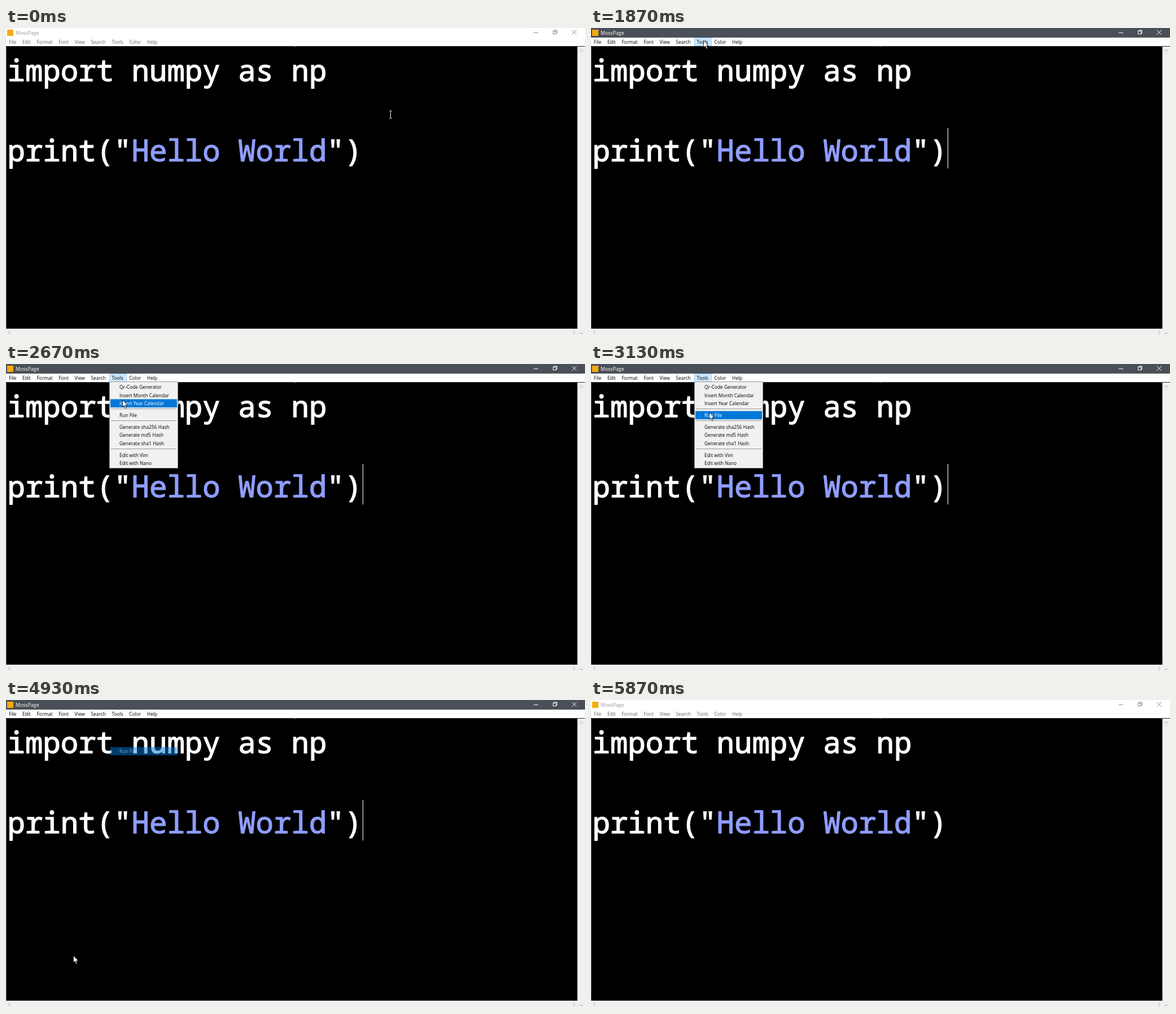
An HTML page with a canvas for the animation above (6.19 s loop, 1026 by 546 pixels).

```html
<!DOCTYPE html>
<html lang="en">
<head>
<meta charset="utf-8">
<title>MossPage</title>
<style>
html, body { margin: 0; width: 100%; height: 100%; overflow: hidden; background: #000; }
canvas { display: block; }
</style>
</head>
<body>
<canvas id="stage" width="1026" height="546"></canvas>
<script>
const ctx = document.getElementById('stage').getContext('2d');
const LOOP = 6190;
const STEP = 1000 / 15; // the pointer moves at 15 steps per second
const UI = '"Open Sans", "Noto Sans", sans-serif';
const CODE = '500 52.4px "Noto Sans Mono", "DejaVu Sans Mono", monospace';
const LABEL = '8.4px ' + UI;
const BLUE = '#8f9dff';

const FOCUS = [1870, 5870];
const MENU = [2070, 4870];
const LINGER = [4870, 5130];
const POINTER_GONE = 5600;

// pointer moves: start, end, target x, target y
const HOME = [681.5, 153.5];
const MOVES = [
  [600, 730, 300.5, 41], [800, 930, 279, 72], [930, 1400, 199.5, 22],
  [2470, 2730, 207, 66], [2800, 3130, 209.5, 85.5], [3530, 3870, 214.5, 89.5],
  [4800, 4930, 119.5, 453], [5000, 5130, 107.5, 501], [5200, 5530, 52.5, 540]
];

const TABS = ['File', 'Edit', 'Format', 'Font', 'View', 'Search', 'Tools', 'Color', 'Help'];
const GROUPS = [
  ['Qr-Code Generator', 'Insert Month Calendar', 'Insert Year Calendar'],
  ['Run File'],
  ['Generate sha256 Hash', 'Generate md5 Hash', 'Generate sha1 Hash'],
  ['Edit with Vim', 'Edit with Nano']
];
const ROW = 14.35, GAP = 6.7;

const within = (t, [from, to]) => t >= from && t < to;

// lays the menu groups out from the top, with a rule above all but the first
const items = [], rules = [];
let rowY = 41;
for (const group of GROUPS) {
  if (items.length) {
    rules.push(Math.round(rowY - ROW / 2 - 1));
    rowY += GAP;
  }
  for (const label of group) {
    items.push({ label, y: rowY });
    rowY += ROW;
  }
}
const chosen = items.find(item => item.label === 'Run File');

function rect(x, y, w, h, color) {
  ctx.fillStyle = color;
  ctx.fillRect(x, y, w, h);
}

function frame(x, y, w, h, color) {
  ctx.strokeStyle = color;
  ctx.lineWidth = 1;
  ctx.strokeRect(x + 0.5, y + 0.5, w - 1, h - 1);
}

function text(s, x, y, color, font, weight = 0) {
  ctx.font = font;
  ctx.fillStyle = ctx.strokeStyle = color;
  ctx.fillText(s, x, y);
  if (weight) {
    ctx.lineWidth = weight;
    ctx.strokeText(s, x, y);
  }
  return x + ctx.measureText(s).width;
}

function path(points, color) {
  ctx.beginPath();
  points.forEach(([x, y]) => ctx.lineTo(x, y));
  ctx.strokeStyle = color;
  ctx.lineWidth = 1;
  ctx.stroke();
}

function chevron(x, y, dx, dy) {
  const a = 3, b = 1.6;
  path([[x - b * dx - a * dy, y - b * dy - a * dx], [x + b * dx, y + b * dy],
    [x - b * dx + a * dy, y - b * dy + a * dx]], '#a3a3a3');
}

function titleBar(active) {
  const ink = active ? '#fff' : '#8c8c8c';
  rect(0, 0, 1026, 17, active ? '#4b5058' : '#fff');
  rect(2, 3, 11, 11, '#f5aa0c');
  text('MossPage', 17, 12, active ? '#fff' : '#999', '8.8px ' + UI);
  path([[935, 8.5], [943, 8.5]], ink);
  frame(969, 5, 6, 6, ink);
  path([[971, 5], [971, 3.9], [976.5, 3.9], [976.5, 9.5], [975, 9.5]], ink);
  path([[1003, 3.7], [1011, 11.7]], ink);
  path([[1011, 3.7], [1003, 11.7]], ink);
}

function menuBar(active, hot) {
  rect(0, 17, 1026, 15, '#fff');
  if (hot) {
    rect(183, 17, 31, 15, '#cce8ff');
    frame(183, 17, 31, 15, '#99d1ff');
  }
  let x = 5;
  for (const tab of TABS) x = text(tab, x, 27.7, active ? '#000' : '#666', LABEL) + 10.7;
}

function code(s, x, y, color) {
  return text(s, x, y, color, CODE, 1.3);
}

function editor(caret) {
  rect(0, 32, 1026, 514, '#f0f0f0');
  rect(0, 32, 1012.5, 501, '#000');
  rect(0, 32, 1026, 1, '#26332b');
  rect(0, 33, 1, 500, '#555');
  rect(512, 32, 1, 1, '#fff');
  code('import numpy as np', 2.5, 94, '#fff');
  let x = code('print("', 2.5, 235.5, '#fff');
  x = code('Hello World', x, 235.5, BLUE);
  code('")', x, 235.5, '#fff');
  if (caret) rect(632, 177, 1, 72, '#fff');
  chevron(1019.5, 40, 0, -1);
  chevron(1019.5, 541, 0, 1);
  chevron(6, 540, -1, 0);
  chevron(1007, 540, 1, 0);
}

function menuItem({ label, y }, lit) {
  if (lit) rect(185, y - 7.3, 118, 14.6, '#0078d7');
  text(label, 201, y + 3.2, lit ? '#fff' : '#000', LABEL);
}

function menu(pointerY) {
  rect(185, 33, 122, 152, 'rgba(0,0,0,0.2)');
  rect(183, 31, 122, 154, '#f1f1f1');
  frame(183, 31, 122, 154, '#999');
  for (const y of rules) rect(186, y + 3, 116, 1, '#969696');
  for (const item of items) menuItem(item, Math.abs(pointerY - item.y) < ROW / 2);
}

function faded(alpha, paint) {
  ctx.globalAlpha = alpha;
  paint();
  ctx.globalAlpha = 1;
}

function pointerAt(t) {
  const now = Math.floor((t + 4) / STEP) * STEP + 1;
  let [x, y] = HOME;
  for (const [from, to, toX, toY] of MOVES) {
    const p = Math.min(1, Math.max(0, (now - from) / (to - from)));
    const ease = p * (2 - p);
    x += (toX - x) * ease;
    y += (toY - y) * ease;
  }
  return [x, y];
}

function beam(x, y) {
  rect(x - 0.5, y - 6, 1, 12, '#fff');
  rect(x - 2.5, y - 7, 5, 1, '#ddd');
  rect(x - 2.5, y + 6, 5, 1, '#ddd');
}

function arrow(x, y) {
  const shape = [[0, 0], [0, 12.6], [2.8, 10], [4.9, 14.8], [6.9, 13.9], [4.9, 9.3], [8.6, 9.3]];
  ctx.beginPath();
  for (const [px, py] of shape) ctx.lineTo(x + px, y + py);
  ctx.closePath();
  ctx.fillStyle = '#fff';
  ctx.fill();
  ctx.strokeStyle = '#000';
  ctx.lineWidth = 0.8;
  ctx.stroke();
}

// off for a third of every second, once the first long blink is over
const caretOn = t => within(t, FOCUS) && (t < 2530 || !within(t % 1000, [270, 600]));

function draw(t) {
  const active = within(t, FOCUS);
  const [x, y] = pointerAt(t);
  titleBar(active);
  editor(caretOn(t));
  menuBar(active, active && t < MENU[1]);
  if (within(t, MENU)) faded(t < 2200 ? 0.55 : 1, () => menu(y));
  // the chosen item lingers after the menu closes
  if (within(t, LINGER)) faded(t < 4930 ? 0.8 : 0.5, () => menuItem(chosen, true));
  if (t < POINTER_GONE) (!active && y > 33 ? beam : arrow)(x, y);
}

const start = performance.now();
function tick() {
  draw((performance.now() - start) % LOOP);
  requestAnimationFrame(tick);
}
tick();
</script>
</body>
</html>
```
